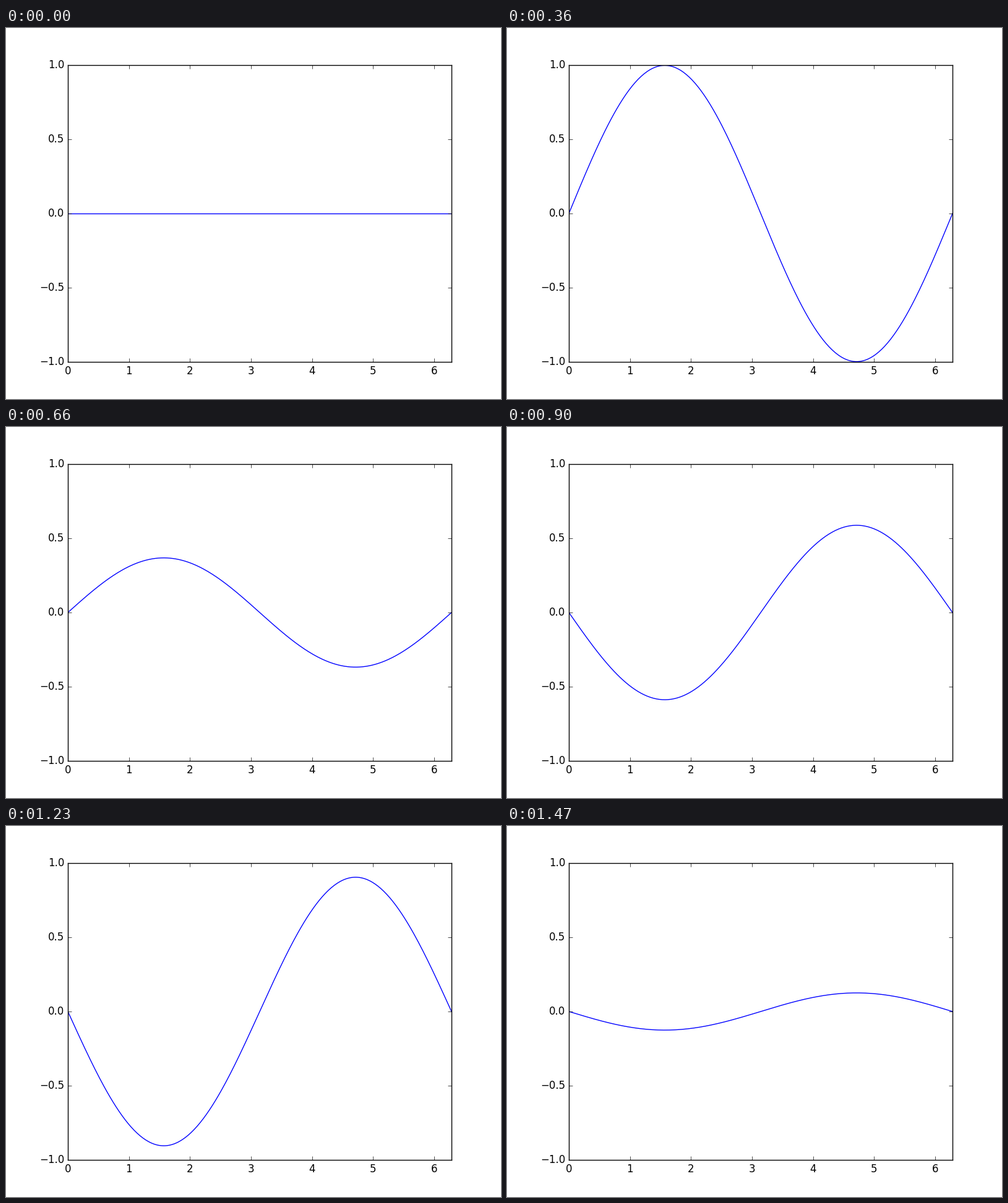
Animation, 800 px wide and 600 px high, one loop 1500 ms. Source, as a matplotlib script:

```python
import numpy as np
import matplotlib.pyplot as plt
from matplotlib.animation import FuncAnimation

FRAMES = 50
INTERVAL = 30  # ms

plt.style.use("classic")
plt.rcParams.update({
    "font.family": "DejaVu Sans",
    "figure.dpi": 100,
    "savefig.dpi": 100,
    "figure.facecolor": "white",
})

fig, ax = plt.subplots(figsize=(8, 6))
x = np.linspace(0, 2 * np.pi, 256)
line, = ax.plot(x, np.zeros_like(x), color="blue", lw=1)
ax.set_xlim(0, 2 * np.pi)
ax.set_ylim(-1, 1)
ax.set_yticks(np.linspace(-1, 1, 5))


def update(frame):
    """Standing wave: the amplitude swings once per loop."""
    amplitude = np.sin(2 * np.pi * frame / FRAMES)
    line.set_ydata(amplitude * np.sin(x))
    return line,


anim = FuncAnimation(fig, update, frames=FRAMES, interval=INTERVAL,
                     repeat=True, repeat_delay=0, blit=False)
plt.show()
```
